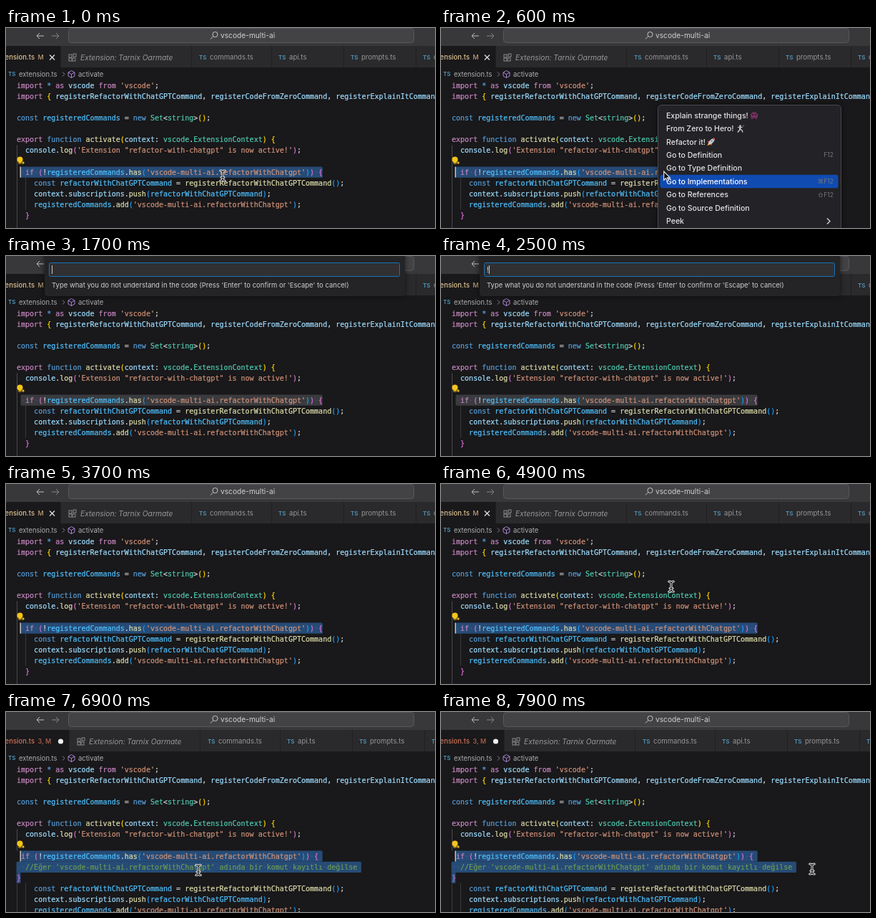
Write an HTML page with a canvas that moves like this. It is 600 px wide and 279 px high and loops after 8000 ms.

```html
<!DOCTYPE html>
<html lang="en">
<head>
<meta charset="utf-8">
<title>Editor demo</title>
<style>
html, body { margin: 0; width: 100%; height: 100%; overflow: hidden; background: #19181a; }
canvas { display: block; width: 600px; height: 279px; }
</style>
</head>
<body>
<canvas id="stage"></canvas>
<script>
const W = 600, H = 279, LOOP = 8000;
const MENU_AT = 450, INPUT_AT = 1600, TYPE_AT = 2300, CLOSE_AT = 2700, EDIT_AT = 5700;
const canvas = document.getElementById('stage');
const ctx = canvas.getContext('2d');
const dpr = window.devicePixelRatio || 1;
canvas.width = W * dpr;
canvas.height = H * dpr;

const SANS = 'Inter, "Open Sans", sans-serif';
const MONO = '"DejaVu Sans Mono", "Liberation Mono", monospace';
const BG = '#19181a';
const X0 = 15, CW = 6.03, Y0 = 80.6, LH = 15.07;

// The first letter of each token picks its colour.
const INK = {
  p: '#c586c0', b: '#569cd6', v: '#9cdcfe', c: '#4fc1ff', f: '#dcdcaa', t: '#4ec9b0',
  s: '#ce9178', w: '#d4d4d4', y: '#ffd700', m: '#da70d6', u: '#179fff', g: '#6a9955'
};
const ID = "s'vscode-multi-ai.refactorWithChatgpt'";
const CONDITION = ['pif ', 'm(', 'w!', 'cregisteredCommands', 'w.', 'fhas', 'u(', ID, 'u)', 'm) {'];
const HEAD = [
  ['pimport ', 'b* ', 'pas ', 'vvscode ', 'pfrom ', "s'vscode'", 'w;'],
  ['pimport ', 'y{ ', 'vregisterRefactorWithChatGPTCommand', 'w, ', 'vregisterCodeFromZeroCommand', 'w, ',
    'vregisterExplainItCommand'],
  [],
  ['bconst ', 'cregisteredCommands ', 'w= ', 'bnew ', 'tSet', 'w<', 'tstring', 'w>', 'y()', 'w;'],
  [],
  ['pexport ', 'bfunction ', 'factivate', 'y(', 'vcontext', 'w: ', 'tvscode', 'w.', 'tExtensionContext', 'y) {'],
  ['w  ', 'vconsole', 'w.', 'flog', 'm(', "s'Extension \"refactor-with-chatgpt\" is now active!'", 'm)', 'w;'],
  []
];
const BODY = [
  ['w    ', 'bconst ', 'crefactorWithChatGPTCommand ', 'w= ', 'fregisterRefactorWithChatGPTCommand', 'u()', 'w;'],
  ['w    ', 'vcontext', 'w.', 'vsubscriptions', 'w.', 'fpush', 'u(', 'crefactorWithChatGPTCommand', 'u)', 'w;'],
  ['w    ', 'cregisteredCommands', 'w.', 'fadd', 'u(', ID, 'u)', 'w;'],
  ['w  ', 'm}']
];
const BEFORE = [...HEAD, ['w  ', ...CONDITION], ...BODY];
const AFTER = [
  ...HEAD, ['w ', ...CONDITION],
  ["g  //Eğer 'vscode-multi-ai.refactorWithChatgpt' adında bir komut kayıtlı değilse"],
  ['m}'], ...BODY
];

const MENU = [
  ['Explain strange things!'], ['From Zero to Hero!'], ['Refactor it!'],
  ['Go to Definition', 'F12'], ['Go to Type Definition'], ['Go to Implementations', '⌘F12'],
  ['Go to References', '⇧F12'], ['Go to Source Definition'], ['Peek']
];

// Pointer paths: time, x, y
const ARROW_PATH = [[450, 303, 206], [620, 312, 200], [1100, 393, 117], [1600, 393, 117]];
const BEAM_PATH = [[4500, 345, 152], [4850, 322, 143], [5150, 322, 143], [5950, 181, 221],
  [6500, 181, 221], [7700, 519, 219], [8000, 519, 219]];

function along(path, t) {
  if (t <= path[0][0]) return path[0].slice(1);
  for (let i = 1; i < path.length; i++) {
    const [t0, ax, ay] = path[i - 1], [t1, bx, by] = path[i];
    if (t <= t1) {
      const k = (t - t0) / (t1 - t0), e = k * k * (3 - 2 * k);
      return [ax + (bx - ax) * e, ay + (by - ay) * e];
    }
  }
  return path[path.length - 1].slice(1);
}

function box(x, y, w, h, fill) {
  ctx.fillStyle = fill;
  ctx.fillRect(x, y, w, h);
}

function panel(x, y, w, h, r, fill, edge) {
  ctx.beginPath();
  ctx.roundRect(x, y, w, h, r);
  ctx.fillStyle = fill;
  ctx.fill();
  if (edge) {
    ctx.strokeStyle = edge;
    ctx.lineWidth = 1;
    ctx.stroke();
  }
}

function line(color, width, ...pts) {
  ctx.beginPath();
  for (let i = 0; i < pts.length; i += 2) ctx.lineTo(pts[i], pts[i + 1]);
  ctx.strokeStyle = color;
  ctx.lineWidth = width;
  ctx.stroke();
}

function shape(fill, ...pts) {
  ctx.beginPath();
  for (let i = 0; i < pts.length; i += 2) ctx.lineTo(pts[i], pts[i + 1]);
  ctx.closePath();
  ctx.fillStyle = fill;
  ctx.fill();
}

function disc(x, y, r, fill) {
  ctx.beginPath();
  ctx.arc(x, y, r, 0, 7);
  ctx.fillStyle = fill;
  ctx.fill();
}

function label(s, x, y, size, fill, style = '', align = 'left') {
  ctx.font = `${style} ${size}px ${SANS}`;
  ctx.textAlign = align;
  ctx.fillStyle = fill;
  ctx.fillText(s, x, y + size * 0.35);
  ctx.textAlign = 'left';
}

const fileMark = (x, y) => label('TS', x, y, 8, '#4f97ba', '600');

function titleBar() {
  box(0, 0, W, 25, '#38373a');
  for (const [x, d] of [[48, -1], [69, 1]]) {
    const tip = x + 5 * d, color = d < 0 ? '#c0c0c1' : '#858587';
    line(color, 1, x - 5 * d, 11, tip, 11);
    line(color, 1, tip - 4 * d, 7, tip, 11, tip - 4 * d, 15);
  }
  panel(87.5, 0.5, 483, 20, 4, '#434245', '#58575a');
  ctx.beginPath();
  ctx.arc(292.5, 9, 3.6, 0, 7);
  ctx.strokeStyle = '#c4c4c5';
  ctx.lineWidth = 1;
  ctx.stroke();
  line('#c4c4c5', 1, 290, 11.5, 286, 15.5);
  label('vscode-multi-ai', 300, 10.5, 10.2, '#d0d0d1');
}

function tabs(edited) {
  const d = edited ? 12 : 0;
  box(0, 25, W, 30, '#2a292b');
  box(0, 25, 76 + d, 30, BG);
  const ink = edited ? '#cf7358' : '#dfc392';
  label('extension.ts', 40, 41, 9.5, ink, '500', 'right');
  label(edited ? '3, M' : 'M', 44.5, 41, 9, edited ? '#b5654e' : '#b99f74', '500');
  if (edited) {
    disc(76.5, 41, 3.6, '#f0f0f0');
  } else {
    line('#e0e0e0', 1.2, 61, 37.5, 68, 44.5);
    line('#e0e0e0', 1.2, 68, 37.5, 61, 44.5);
  }
  ctx.strokeStyle = '#8a898b';
  ctx.lineWidth = 1;
  for (const [x, y] of [[88, 37], [88, 42], [93, 42], [94, 36]]) ctx.strokeRect(x + d, y, 4, 4);
  label('Extension: Tarnix Oarmate', 104 + d, 41, 10.3, '#979698', 'italic');
  for (const [x, name] of [[270, 'commands.ts'], [381, 'api.ts'], [482, 'prompts.ts'], [583, 'config.ts']]) {
    fileMark(x + d, 41);
    label(name, x + 15 + d, 41, 9.6, '#979698');
  }
  for (const x of [76, 259, 371, 472, 573]) box(x + d, 25, 1, 30, '#211f22');
}

function breadcrumb() {
  const y = 64.5, x = 91.5, c = '#a983d0';
  fileMark(3, y);
  label('extension.ts', 18, y, 9.4, '#aeadaf');
  line('#868587', 1, 79, y - 3, 82, y, 79, y + 3);
  line(c, 1, x, y - 5, x + 4.5, y - 2.5, x + 4.5, y + 2.5, x, y + 5, x - 4.5, y + 2.5, x - 4.5, y - 2.5, x, y - 5);
  line(c, 1, x - 4.5, y - 2.5, x, y, x + 4.5, y - 2.5);
  line(c, 1, x, y, x, y + 5);
  label('activate', 101, y, 9.5, '#aeadaf');
}

function bulb() {
  disc(19.5, 183.5, 4, '#f5c518');
  box(17.5, 186, 4, 3.5, '#f5c518');
  box(18, 188, 3, 0.8, '#6b5510');
  shape('#f5c518', 24, 185.5, 24.8, 187.2, 26.5, 188, 24.8, 188.8, 24, 190.5, 23.2, 188.8, 21.5, 188, 23.2, 187.2);
}

const rowTop = row => Y0 + row * LH - 7.6;

function select(row, from, to, fill) {
  panel(X0 + from * CW - 0.5, rowTop(row), (to - from) * CW, LH + 0.2, 1.5, fill);
}

function code(edited, focus, caret) {
  const rows = edited ? AFTER : BEFORE;
  const fill = focus ? '#264b76' : '#3a3b3f';
  const ranges = edited ? { 8: [1, 71], 9: [0, 80], 10: [0, 1] } : { 8: [1, 71] };

  box(X0, rowTop(6), 1, edited ? LH * 2 : 300, '#4a494b');
  if (edited) box(X0, rowTop(11), 1, 100, '#3c3b3d');
  const first = edited ? 11 : 9;
  box(X0 + CW * 2, rowTop(first), 1, LH * 3, '#3c3b3d');
  for (const r in ranges) select(+r, ...ranges[r], fill);

  ctx.font = `10.02px ${MONO}`;
  ctx.lineWidth = 0.22;
  rows.forEach((tokens, r) => {
    const y = Y0 + r * LH;
    let col = 0;
    for (const token of tokens) {
      const s = token.slice(1);
      ctx.fillStyle = ctx.strokeStyle = INK[token[0]];
      ctx.fillText(s, X0 + col * CW, y + 3.4);
      ctx.strokeText(s, X0 + col * CW, y + 3.4);
      const span = ranges[r];
      if (span) {
        [...s].forEach((ch, i) => {
          const at = col + i;
          if (ch === ' ' && at >= span[0] && at < span[1]) {
            box(X0 + at * CW + 2.5, y - 0.4, 1, 1, focus ? '#587697' : '#66686c');
          }
        });
      }
      col += s.length;
    }
  });
  bulb();
  if (caret) box(X0 + CW - 1.5, rowTop(8), 1.4, LH, '#d0d0d0');
}

function monster(x, y) {
  const c = '#74325f';
  box(x - 3, y - 4.5, 6, 8, c);
  box(x - 5, y - 2.5, 10, 5, c);
  box(x - 4, y + 3, 2, 2, c);
  box(x + 2, y + 3, 2, 2, c);
  box(x - 2.5, y - 2, 1.5, 2, '#26121f');
  box(x + 1, y - 2, 1.5, 2, '#26121f');
}

function fencer(x, y) {
  disc(x - 0.5, y - 3.7, 1.6, '#b7b7b7');
  line('#d5d3d0', 2, x - 0.5, y - 2, x - 1, y + 1.5);
  line('#d5d3d0', 1.3, x - 4, y + 5, x - 1, y + 1, x + 2, y + 2, x + 3, y + 5);
  line('#d5d3d0', 1.1, x - 4, y - 2, x - 1, y - 1.5, x + 2.5, y - 2);
  line('#9c9c9c', 0.7, x + 2.5, y - 2, x + 5, y - 5.5);
}

function rocket(x, y) {
  ctx.save();
  ctx.translate(x, y);
  ctx.rotate(Math.PI / 4);
  shape('#c9433b', -1.5, -1, -4.5, 4, -1.5, 3.5);
  shape('#c9433b', 1.5, -1, 4.5, 4, 1.5, 3.5);
  ctx.beginPath();
  ctx.ellipse(0, -0.5, 2.5, 6, 0, 0, 7);
  ctx.fillStyle = '#c9cbd0';
  ctx.fill();
  shape('#c9433b', 0, -7, -2, -4, 2, -4);
  disc(0, -1, 1.1, '#4a7fae');
  shape('#f2a032', -1.6, 4.5, 0, 8, 1.6, 4.5);
  ctx.restore();
}

function menu([px, py]) {
  ctx.save();
  ctx.shadowColor = 'rgba(0,0,0,.5)';
  ctx.shadowBlur = 8;
  panel(303.5, 107.5, 256, 200, 5, '#232226');
  ctx.restore();
  panel(303.5, 107.5, 256, 200, 5, '#232226', '#49484c');
  const hover = px > 306 ? Math.floor((py + 5 - 112.5) / 18.45) : -1;
  MENU.forEach(([name, keys], i) => {
    const y = 122 + i * 18.45, on = i === hover;
    if (on) panel(306.5, y - 9.5, 249, 18.6, 3, '#104bb2');
    label(name, 315, y, 10.55, on ? '#ffffff' : '#e4e4e5', '500');
    if (keys) label(keys, 549, y, 8.5, '#77767a', '', 'right');
  });
  monster(438, 122);
  fencer(419, 140.5);
  rocket(378, 158.5);
  line('#d8d8d9', 1.3, 540, 265.5, 544, 269.5, 540, 273.5);
}

function inputBox(t) {
  ctx.save();
  ctx.shadowColor = 'rgba(0,0,0,.6)';
  ctx.shadowBlur = 7;
  panel(54, -6, 504, 62, 4, '#242325');
  ctx.restore();
  panel(60.5, 9.5, 490, 19, 2, '#303033', '#1673b5');
  const typed = t >= TYPE_AT;
  if (typed) label('!', 64, 19, 10.5, '#d6d6d6');
  if ((t - INPUT_AT) % 1000 < 500 || (typed && t < 2600)) box(typed ? 67 : 64, 13, 1, 12, '#c8c8c8');
  label("Type what you do not understand in the code (Press 'Enter' to confirm or 'Escape' to cancel)",
    64, 41, 9.5, '#cececf');
}

function beam([x, y]) {
  for (const [color, w] of [['#f2f2f2', 3], ['#19191b', 1.2]]) {
    ctx.beginPath();
    for (const s of [-1, 1]) {
      ctx.moveTo(x - 3.2, y + 7 * s);
      ctx.quadraticCurveTo(x, y + 7 * s, x, y + 4.5 * s);
      ctx.quadraticCurveTo(x, y + 7 * s, x + 3.2, y + 7 * s);
    }
    ctx.moveTo(x, y - 5);
    ctx.lineTo(x, y + 5);
    ctx.moveTo(x - 2, y + 2.5);
    ctx.lineTo(x + 2, y + 2.5);
    ctx.lineCap = 'round';
    ctx.strokeStyle = color;
    ctx.lineWidth = w;
    ctx.stroke();
    ctx.lineCap = 'butt';
  }
}

function arrow([x, y]) {
  const pts = [0, 0, 0, 12, 2.8, 9.4, 4.7, 13.6, 6.6, 12.8, 4.8, 8.7, 8.6, 8.7]
    .map((v, i) => v + (i % 2 ? y : x));
  shape('#0b0b0c', ...pts);
  line('#f4f4f4', 1.1, ...pts, x, y, x, y + 1);
}

function draw(t) {
  const menuOpen = t >= MENU_AT && t < INPUT_AT;
  const asking = t >= INPUT_AT && t < CLOSE_AT;
  const edited = t >= EDIT_AT;
  const caret = t < INPUT_AT || (t >= CLOSE_AT && (t + 500) % 1000 < 500);

  ctx.setTransform(dpr, 0, 0, dpr, 0, 0);
  box(0, 0, W, H, BG);
  titleBar();
  tabs(edited);
  breadcrumb();
  code(edited, !asking, caret);
  if (menuOpen) {
    const at = along(ARROW_PATH, t);
    menu(at);
    arrow(at);
  }
  if (asking) inputBox(t);
  if (t < MENU_AT) beam([303, 206]);
  if (t >= BEAM_PATH[0][0]) beam(along(BEAM_PATH, t));
}

const start = performance.now();
function tick() {
  draw((performance.now() - start) % LOOP);
  requestAnimationFrame(tick);
}
tick();
</script>
</body>
</html>
```
